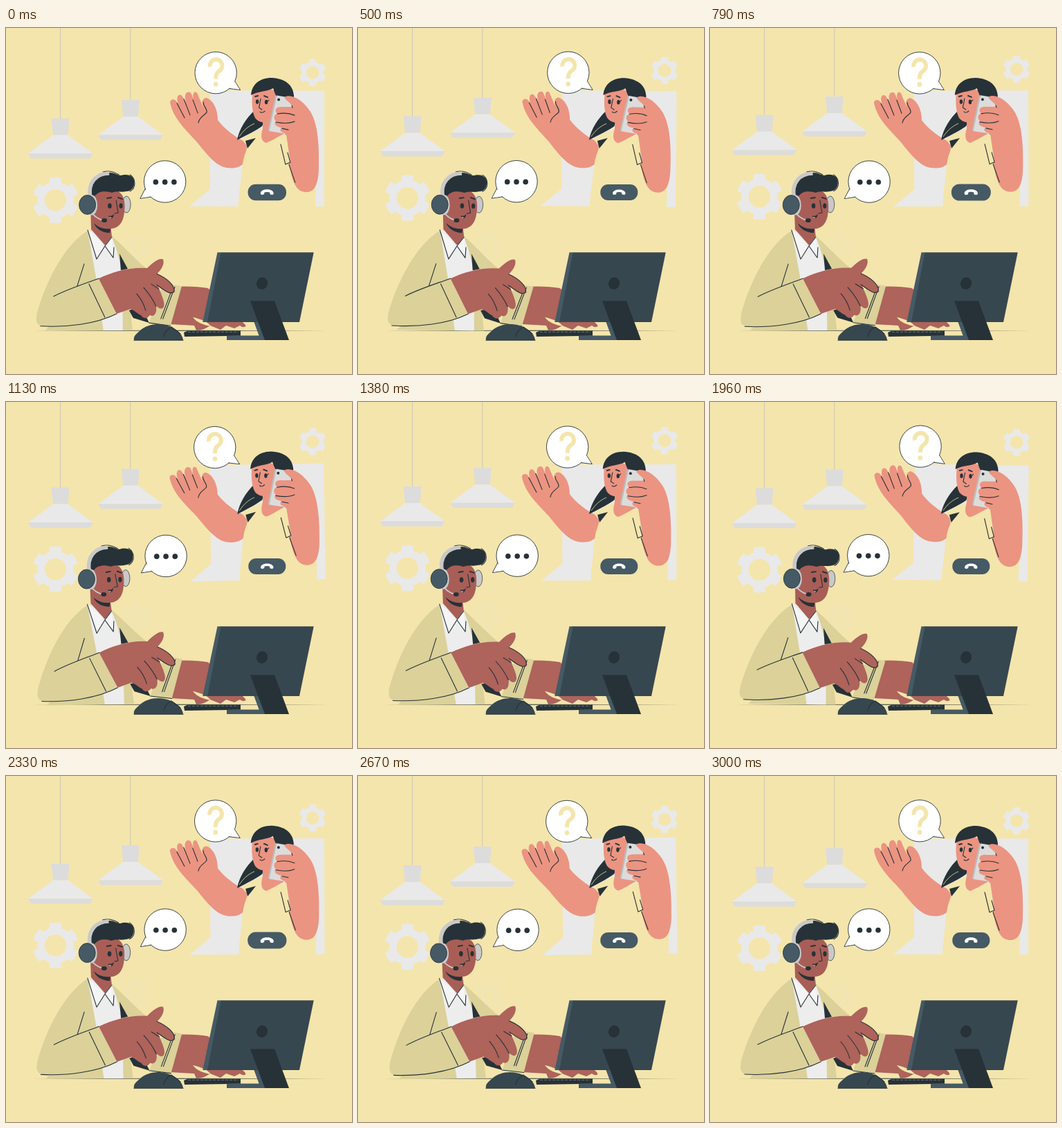
Write an HTML page that moves like this. It is 500 px wide and 500 px high and loops after 3040 ms.

```html
<!DOCTYPE html>
<html lang="en">
<head>
<meta charset="utf-8">
<title>Support call</title>
<style>
  html, body { margin: 0; width: 100%; height: 100%; overflow: hidden; background: #f4e5ac; }
  svg { display: block; width: 100%; height: 100%; }
  .pale { fill: #e9e9e9; }
  .grey { fill: #dcdcdc; }
  .ink { fill: #263238; }
  .slate { fill: #37474f; }
  .steel { fill: #455a64; }
  .bg { fill: #f4e5ac; }
  .rose { fill: #eb9481; }
  .brown { fill: #ae635b; }
  .face { fill: #a85e56; }
  .coat { fill: #dbd199; }
  .white { fill: #fff; }
  .line { fill: none; stroke: #263238; stroke-width: 1.1; stroke-linecap: round; stroke-linejoin: round; }
  .bold { stroke-width: 1.9; }
  .bubble { fill: #fff; stroke: #263238; stroke-width: .9; stroke-linejoin: round; }
</style>
</head>
<body>
<svg viewBox="0 0 500 500">
  <defs>
    <g id="lamp">
      <path d="M78.5-60V132" stroke="#cbc8b8" fill="none"/>
      <path class="grey" d="M65.500 131H91.500L89.500 155H68Z"/>
      <path class="pale" d="M68 155H89.500L125.500 181.500H32Z"/>
      <path class="grey" d="M32 181.500H125.500L121.500 188.800H36Z"/>
    </g>
  </defs>

  <g class="float">
    <path id="bigGear" class="pale" fill-rule="evenodd"/>
    <path id="smallGear" class="pale" fill-rule="evenodd"/>
    <path id="faintGear" fill="none" stroke="#e9e4c8" stroke-width="1.200" stroke-dasharray="13 5"/>
    <use href="#lamp"/>
    <use href="#lamp" x="101.300" y="-26.800"/>
  </g>

  <g id="caller">
    <path class="pale" d="M295 90.500H460V257.800H265L295 233Z"/>
    <path class="bg" d="M344 166L371 148L400 154L409 192L448 222L447 259H336C336 240 341 215 342 190Z"/>
    <!-- raised arm -->
    <path class="rose" d="M237 108C237 103 243 102 246 106L249 110C245 100 249 94 254 98L260 107C256 95 262 90 267 94L272 105C268 95 272 90 276 94L285 115C281 104 287 99 292 102C300 106 306 118 306 133C315 145 330 157 345 164L350 171C346 179 343 188 342 197C335 203 327 203 319 202C304 200 291 184 276 165C260 147 242 132 237 108Z"/>
    <path class="line" d="M247 109L258 130M257 103L266 126M270 104L277 123M285 107C285 114 291 116 290 122C286 127 279 129 278 137"/>
    <!-- hair, neck, face -->
    <path class="ink" d="M357 121C348 130 337 145 334 162C343 157 357 151 370 142L376 130Z"/>
    <path d="M337 157C343 148 350 142 359 138" fill="none" stroke="#f4e5ac" stroke-width=".8"/>
    <path class="bg" d="M340 160C349 154 360 149 371 145L369 166L347 188L348 170Z"/>
    <path class="ink" d="M346 163L361 159L349 174Z"/>
    <path class="rose" d="M371 130L392 132L402 153C394 156 387 162 376 166C368 164 368 155 371 145Z"/>
    <path class="rose" d="M356 95C355 106 355 121 360 130C366 138 377 138 383 133C390 126 393 110 392 93L374 84Z"/>
    <path class="ink" d="M354 97C355 82 366 72 384 72C403 73 415 82 416 98L414 112L394 104C390 98 388 94 386 87C378 92 365 91 354 97Z"/>
    <ellipse class="ink" cx="363" cy="106.500" rx="2.200" ry="3.300"/>
    <ellipse class="ink" cx="376" cy="107" rx="2.200" ry="3.300"/>
    <path class="line bold" d="M360 99L364 98M373 98L378 100"/>
    <path class="line" d="M377 107L380 104M368 102L365.500 115L370 118M367 121C369 123 372 122 374 120"/>
    <!-- phone -->
    <path d="M389 98L392 97.500L382 149L378.500 148Z" fill="#bcbcbc"/>
    <path class="grey" d="M391.500 97.500L412 101Q416 102 415 107L405 153L380.500 149Z"/>
    <circle class="ink" cx="394" cy="103.500" r="2"/>
    <!-- holding arm -->
    <path class="rose" d="M402 100C412 94 429 104 440 121C451 139 453 170 452 205C451 228 445 237 434 237C422 237 416 227 412 210C407 190 405 170 403 152C398 151 394 148 398 144C390 143 386 138 390 135C386 130 387 125 392 124C386 117 392 113 399 114L414 114C412 108 405 106 402 100Z"/>
    <path class="line" d="M392 124C402 122 410 123 417 126M390 136C400 138 410 138 417 135M399 145L408 147M413 112L414 115"/>
    <path class="bg" d="M396 157L405 154L411 194L404 197Z"/>
    <path class="line" d="M397 168L404 197L411 194L407 180M409 197L418 223"/>
    <!-- question bubble -->
    <path class="bubble" d="M330 76L338.500 89.500L318 87Z"/>
    <circle class="bubble" cx="303" cy="64.800" r="30.200"/>
    <path class="white" d="M328 74L337 88.500L316 85.500Z"/>
    <path d="M294.500 56A9 9 0 1 1 307.500 62.500Q303 65.500 303 73.500" fill="none" stroke="#f4e5ac" stroke-width="6"/>
    <circle class="bg" cx="303" cy="81.300" r="3.400"/>
  </g>

  <g id="button">
    <rect class="steel" x="350.300" y="226" width="54" height="23" rx="11"/>
    <path class="white" d="M368 239C368 231.500 386.500 231.500 386.500 239Q386.500 241 384.500 241L382 240.500Q381 240 381 237.500Q377.300 236.300 373.500 237.500Q373.500 240 372.500 240.500L370 241Q368 241 368 239Z"/>
  </g>

  <path class="ink" d="M36 437.200L250 436.700L467 437.200L250 437.700Z"/>

  <!-- typing forearm -->
  <path class="brown" d="M248 374C265 373 280 374 292 376L320 404L345 428C349 432 343 434 338 430L330 434L318 430L310 436L295 430C289 434 284 437 275 437L272 430L237 428Z"/>
  <path class="bg" d="M270 418C280 420 291 424 296 431C285 429 276 426 270 418Z"/>

  <g id="agent">
    <path class="coat" d="M118 293C84 314 58 366 45 412C42 428 46 432 62 432L57 437H183L180 408L225 385L205 349C186 334 168 313 153 301Z"/>
    <path fill="#ededed" d="M118 292L153 302L159 318L168 350L169 437H141L130 360Z"/>
    <path class="ink" d="M164 326L176 348L166 350Z"/>
    <path class="face" d="M122 258L123 291L143 314L153 302L151 285Z"/>
    <path class="ink" d="M127 282C134 289 142 291 151 290L150 296C139 296 130 290 127 282Z"/>
    <path fill="#f5f5f5" d="M118 291L143 315L131 334ZM153 301L143 315L155 332Z"/>
    <path class="line" d="M118 292L131 334L143 315L155 332L156 317M143 315L153 302"/>

    <!-- head -->
    <ellipse cx="174" cy="255" rx="6" ry="12" fill="#c9c9c9" stroke="#263238" stroke-width=".7"/>
    <path class="face" d="M124 234L160 235C172 240 173 256 170 272C167 286 158 291 148 290C135 288 126 279 122 268Z"/>
    <path class="ink" d="M124 241C120 222 132 209 150 209C157 209 161 213 166 213C174 210 184 213 185 221C186 230 181 236 174 236C166 238 160 235 153 238C144 235 134 235 128 243Z"/>
    <path class="line" d="M140 208C150 205 158 209 163 212M179 212C188 218 188 231 179 236"/>
    <path d="M122 246C117 223 131 210 149 210" fill="none" stroke="#c9c9c9" stroke-width="5.500"/>
    <ellipse cx="124" cy="256" rx="8" ry="14.500" fill="#c9c9c9"/>
    <ellipse class="steel" cx="117.500" cy="255.500" rx="12" ry="14" stroke="#263238" stroke-width=".8"/>
    <path d="M125 268C129 274 134 276 140 278" fill="none" stroke="#c9c9c9" stroke-width="1.800"/>
    <ellipse class="ink" cx="142" cy="278" rx="4" ry="3"/>
    <ellipse class="ink" cx="149.800" cy="257" rx="2.800" ry="3.800"/>
    <ellipse class="ink" cx="166" cy="257" rx="2.600" ry="3.800"/>
    <path class="line bold" d="M146 246L152 245M162 245L168 247"/>
    <path class="line" d="M159 249L162 267L157 268"/>
    <path class="ink" d="M148 271Q152 273 156 269Q155 276 150 276Z"/>
    <path d="M149 273Q152 273 153 274L150 276Z" fill="#e58c95"/>

    <!-- sleeves -->
    <path class="ink" d="M178 408L184 419L207 426L196 403Z"/>
    <path class="coat" d="M222 380L238 370L254 373L238 430L207 426Z"/>
    <path class="line" d="M244 374L227 420M238 383L224 420M238 430L207 426"/>
    <path class="coat" d="M69 389L134 361L160 413C130 428 90 434 50 431Z"/>
    <path class="line" d="M69 388C88 378 110 371 134 362M103 373L113 341M120 370L143 418M160 413C130 428 88 433 50 431"/>
    <!-- hand -->
    <path class="brown" d="M134 362C155 352 180 345 204 347C212 339 221 332 227 334C230 341 223 351 218 355C232 361 245 372 244 381C240 387 230 380 220 373C224 384 231 397 228 403C225 408 220 404 217 401C219 412 214 418 208 415C204 421 198 420 195 415C190 413 186 408 180 406L160 413Z"/>
    <path class="line" d="M189 384C196 392 200 401 202 408M199 375C207 384 213 393 217 402M210 370L221 377M218 355C232 361 244 371 243 380C239 387 229 379 218 371"/>
  </g>

  <g id="reply">
    <path class="bubble" d="M202 231L194 246.500L214 243.500Z"/>
    <circle class="bubble" cx="229.800" cy="222" r="30.200"/>
    <path class="white" d="M204 231L195.300 245.600L216 242Z"/>
    <circle class="ink" cx="216.500" cy="222.700" r="3.800"/>
    <circle class="ink" cx="229.800" cy="222.700" r="3.800"/>
    <circle class="ink" cx="243" cy="222.700" r="3.800"/>
  </g>

  <!-- desk -->
  <path class="ink" d="M257 440L263 437.500H339V444.800L258 446Z"/>
  <path d="M263 439.300H336" stroke="#55666e" stroke-width="1.200" stroke-dasharray="4 2"/>
  <path class="slate" d="M185 451C184 446 187 443 193 438C200 431 210 428 220 428C238 428 255 439 256 451Z"/>
  <path class="line" d="M185 451.300H256M228 446C229 440 233 435 239 432L252 442"/>
  <path class="steel" d="M319 444.500H373L376 451H319ZM347 394H355L375 451H368Z"/>
  <path class="steel" d="M305.500 324.300H311L292 425H284.300Z"/>
  <path class="slate" d="M310.500 324.300H444.700L424 425H291Z"/>
  <ellipse class="ink" cx="370" cy="369" rx="8" ry="8.800" transform="rotate(20 370 369)"/>
  <path class="ink" d="M353 394.500H388L409 451H374Z"/>
</svg>
<script>
const LOOP = 3040, LEAD = 40;
const $ = id => document.getElementById(id);

function ring(cx, cy, r) {
  return `M${cx - r} ${cy}a${r} ${r} 0 1 0 ${2 * r} 0a${r} ${r} 0 1 0 ${-2 * r} 0Z`;
}

function gear(cx, cy, r) {
  const teeth = 6, root = r * 0.79, pts = [];
  for (let i = 0; i < teeth; i++) {
    const mid = i * 360 / teeth - 90;
    for (const [turn, rad] of [[-25, root], [-19, root], [-15, r], [0, r], [15, r], [19, root], [25, root]]) {
      const a = (mid + turn) * Math.PI / 180;
      pts.push((cx + rad * Math.cos(a)).toFixed(2) + ' ' + (cy + rad * Math.sin(a)).toFixed(2));
    }
  }
  return 'M' + pts.join('L') + 'Z' + ring(cx, cy, r * 0.47);
}

$('bigGear').setAttribute('d', gear(71.5, 249, 33.3));
$('smallGear').setAttribute('d', gear(443, 64.8, 19.8));
$('faintGear').setAttribute('d', gear(190.5, 316.5, 17));

// Steps are [progress, value] pairs joined by straight lines.
const FLOAT = [[0, 0], [.5, -9.6], [1, 0]];
const SWAY = [[0, 0], [.25, 1], [.75, -1], [1, 0]];
const BEAT = [[0, 1], [.1, 1.1], [.3, 1], [.4, 1], [.5, 1.1], [.6, 1], [1, 1]];

function at(steps, p) {
  const i = steps.findIndex(s => s[0] > p);
  const [p0, v0] = steps[i - 1], [p1, v1] = steps[i];
  return v0 + (v1 - v0) * (p - p0) / (p1 - p0);
}

const move = (el, value) => el.setAttribute('transform', value);
const floater = document.querySelector('.float');
const start = performance.now();

function draw(now) {
  const t = Math.max(0, now - start) + LEAD;
  const slow = t % LOOP / LOOP, fast = t * 2 % LOOP / LOOP;
  const sway = at(SWAY, fast);
  move(floater, `translate(0 ${at(FLOAT, slow)})`);
  move($('caller'), `rotate(${sway} 350 146)`);
  move($('agent'), `rotate(${sway} 144 322)`);
  move($('reply'), `translate(${-1.4 * sway} ${-.5 * sway})`);
  move($('button'), `translate(377.3 237.5) scale(${at(BEAT, fast)}) translate(-377.3 -237.5)`);
  requestAnimationFrame(draw);
}
draw(start);
</script>
</body>
</html>
```
